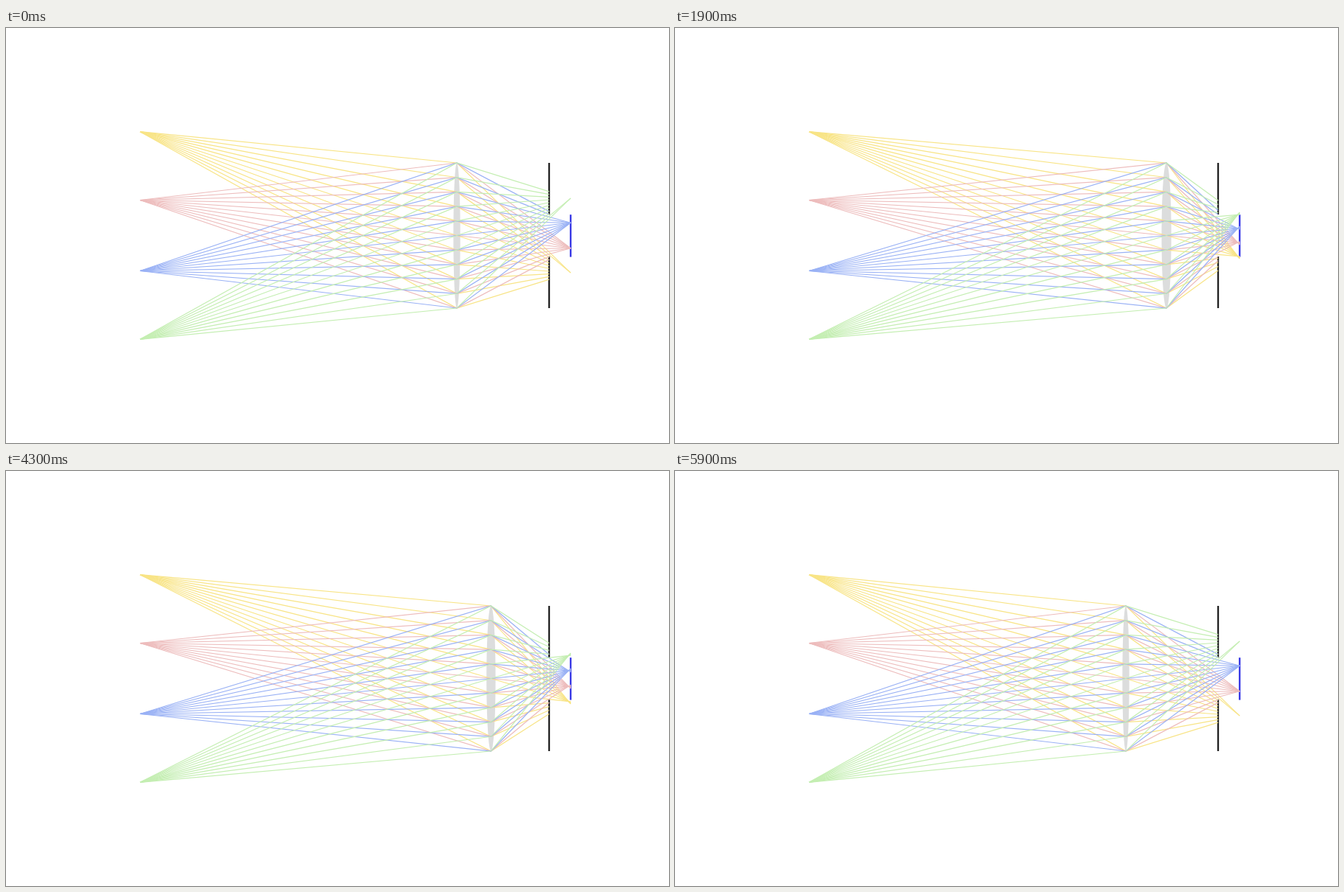
Animation of 900x563 px, one loop 6.9 s. Source, as an HTML page with a canvas:

```html
<!DOCTYPE html>
<html lang="en">
<head>
<meta charset="utf-8">
<title>Focusing lens</title>
<style>
  html, body { margin: 0; width: 100%; height: 100%; overflow: hidden; background: #fff; }
  canvas { display: block; width: 900px; height: 563px; }
</style>
</head>
<body>
<canvas id="stage"></canvas>
<script>
const W = 900, H = 563, LOOP = 6900, STEP = 100, LAST = 59, PEAK = 29;
const AXIS = 281.5, SOURCE_X = 182, STOP_X = 737.3, SCREEN_X = 766.5;
const LENS_R = 98.5, GAP = 28.3, RAYS = 11;
const SOURCES = [
  { y: -140.8, color: '#f8e486' },
  { y: -48, color: '#edbcbc' },
  { y: 48, color: '#99b1f5' },
  { y: 140.8, color: '#c4eeb2' }
];

const canvas = document.getElementById('stage');
const ctx = canvas.getContext('2d');
const ratio = window.devicePixelRatio || 1;
canvas.width = Math.round(W * ratio);
canvas.height = Math.round(H * ratio);

function line(points, color, width) {
  ctx.beginPath();
  points.forEach(([x, y]) => ctx.lineTo(x, AXIS + y));
  ctx.strokeStyle = color;
  ctx.lineWidth = width;
  ctx.stroke();
}

function drawLens(x, focal) {
  ctx.beginPath();
  ctx.ellipse(x, AXIS, 530 / focal, LENS_R, 0, 0, 2 * Math.PI);
  ctx.fillStyle = '#dcdddd';
  ctx.fill();
}

function drawRays(lensX, imageDist, { y, color }) {
  const imageY = -y * imageDist / (lensX - SOURCE_X);
  for (let i = 0; i < RAYS; i++) {
    const lensY = LENS_R * (2 * i / (RAYS - 1) - 1);
    const slope = (imageY - lensY) / imageDist;
    const at = x => lensY + slope * (x - lensX);
    const endX = Math.abs(at(STOP_X)) > GAP ? STOP_X : SCREEN_X;
    line([[SOURCE_X, y], [lensX, lensY], [endX, at(endX)]], color, 1.2);
  }
}

function draw(time) {
  const step = Math.min(Math.floor(time % LOOP / STEP), LAST);
  const n = Math.min(step, LAST - step);
  const lensX = 612 + 2.9 * n;
  // focus falls slightly short of the screen in mid-travel
  const imageDist = SCREEN_X - lensX - 3 * Math.sin(Math.PI * n / PEAK);
  const focal = 1 / (1 / (lensX - SOURCE_X) + 1 / imageDist);

  ctx.setTransform(ratio, 0, 0, ratio, 0, 0);
  ctx.fillStyle = '#fff';
  ctx.fillRect(0, 0, W, H);
  drawLens(lensX, focal);
  line([[STOP_X, -LENS_R], [STOP_X, -GAP]], '#000', 2);
  line([[STOP_X, GAP], [STOP_X, LENS_R]], '#000', 2);
  line([[SCREEN_X, -GAP], [SCREEN_X, GAP + 0.8]], '#1414e0', 2);
  SOURCES.forEach(s => drawRays(lensX, imageDist, s));
}

const start = performance.now();
function tick(now) {
  draw(Math.max(0, now - start));
  requestAnimationFrame(tick);
}
draw(0);
requestAnimationFrame(tick);
</script>
</body>
</html>
```
